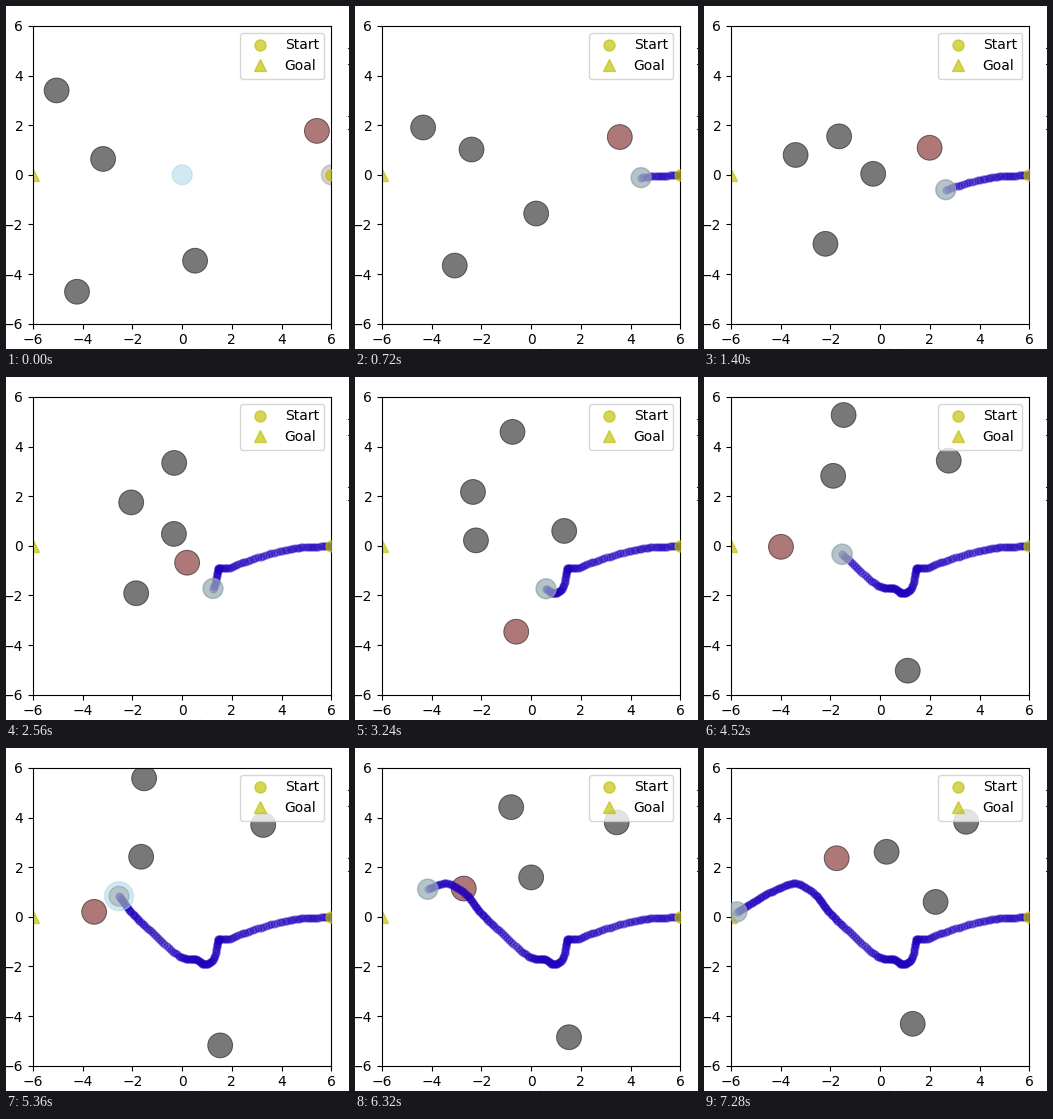
A matplotlib script that plays this animation: 343 by 343 pixels, repeating every 7720 ms.

```python
import numpy as np
import matplotlib.pyplot as plt
from matplotlib.animation import FuncAnimation
from matplotlib.lines import Line2D
from matplotlib.patches import Circle

SIZE, DPI = 343, 100
FRAMES, LAST = 193, 182
LEFT, RIGHT, TOP, BOTTOM = 27.0, 325.3, 19.9, 317.75
GREY, RED = "black", (0.4, 0, 0)
steps = np.arange(LAST + 1)


def glide(t, points):
    """Smooth curve through a few timed points, sampled at every step."""
    t, p = np.array(t), np.array(points)
    m = np.gradient(p, t, axis=0)
    i = np.clip(np.searchsorted(t, steps, side="right") - 1, 0, len(t) - 2)
    h = (t[i + 1] - t[i])[:, None]
    u = (steps - t[i])[:, None] / h
    ease = u * u * (3 - 2 * u)
    return (p[i] + (p[i + 1] - p[i]) * ease
            + h * u * (1 - u) * ((1 - u) * m[i] - u * m[i + 1]))


robot = glide(
    (0, 20, 35, 44, 51, 55, 64, 72, 81, 95, 113, 126, 134, 147, 160, 182),
    [(6, 0), (4.23, -.15), (2.64, -.6), (1.85, -.9), (1.45, -.9),
     (1.42, -1.08), (1.24, -1.72), (.92, -1.92), (.6, -1.73), (-.08, -1.6),
     (-1.53, -.34), (-2.23, .4), (-2.54, .83), (-3.38, 1.35), (-4.3, 1.05),
     (-5.76, .2)])

# All obstacles turn at the same moments.
turns = (0, 35, 64, 81, 113, 134, 182)
obstacles = np.array([glide(turns, way) for way in (
    [(-5.05, 3.4), (-3.4, .8), (-.33, .48), (1.33, .6), (2.76, 3.43),
     (3.26, 3.7), (3.46, 3.83)],
    [(-3.18, .64), (-1.65, 1.55), (-.32, 3.34), (-.75, 4.59), (-1.47, 5.27),
     (-1.53, 5.58), (.26, 2.62)],
    [(.52, -3.46), (-.28, .04), (-2.05, 1.75), (-2.34, 2.17), (-1.89, 2.82),
     (-1.65, 2.42), (2.23, .6)],
    [(-4.23, -4.71), (-2.2, -2.78), (-1.85, -1.91), (-2.22, .22),
     (-3.99, -.04), (-3.54, .2), (-1.75, 2.36)],
    [(5.42, 1.77), (1.99, 1.09), (.2, -.68), (-.6, -3.46), (1.11, -5.03),
     (1.53, -5.18), (1.31, -4.31)],
)])

# The closest obstacle at each step is highlighted.
nearest = np.linalg.norm(obstacles - robot, axis=2).argmin(axis=0)
halo_radius = 0.4 + 0.18 * np.exp(-((steps - 134) / 14) ** 2)

fig = plt.figure(figsize=(SIZE / DPI, SIZE / DPI), dpi=DPI, facecolor="white")
ax = fig.add_axes([LEFT / SIZE, 1 - BOTTOM / SIZE,
                   (RIGHT - LEFT) / SIZE, (BOTTOM - TOP) / SIZE])
ax.set(xlim=(-6, 6), ylim=(-6, 6),
       xticks=range(-6, 7, 2), yticks=range(-6, 7, 2))

trail, = ax.plot([], [], "o", color=(0.13, 0, 0.74), ms=5, alpha=0.4,
                 zorder=2)
ax.plot(6, 0, "yo", ms=8, alpha=0.65, zorder=4, label="Start")
ax.plot(-6, 0, "y^", ms=8, alpha=0.65, zorder=2, label="Goal")
ax.legend(loc="upper right")


def disc(radius, face, edge, alpha, zorder, lw=1):
    return ax.add_patch(Circle((0, 0), radius, facecolor=face, edgecolor=edge,
                               alpha=alpha, zorder=zorder, lw=lw))


balls = [disc(0.5, GREY, "black", 0.53, 1, 0.7) for _ in obstacles]
halo = disc(0.4, "lightblue", "lightblue", 0.55, 3)
body = disc(0.4, "gray", "gray", 0.35, 3.1)


def scrap(x, y):
    fig.add_artist(Line2D([x / SIZE, (x + 1.5) / SIZE], [1 - y / SIZE] * 2,
                          color="black", lw=0.8, alpha=0.8))


# Slivers of neighbouring labels cut off by the stage edge.
for x in (171.5, 184, 193.5):
    scrap(x, 342.5)
for y in (41.5, 57.5, 109.5, 123.5):
    scrap(341.5, y)


def update(i):
    n = min(i, LAST)
    trail.set_data(*robot[:n + 1].T)
    trail.set_visible(n > 0)
    for j, ball in enumerate(balls):
        ball.center = obstacles[j, n]
        ball.set_facecolor(RED if j == nearest[n] else GREY)
    body.center = robot[n]
    halo.center = robot[n] if n else (0, 0)
    halo.set_radius(halo_radius[n])
    return [trail, *balls, halo, body]


anim = FuncAnimation(fig, update, frames=FRAMES, interval=40,
                     init_func=lambda: update(0), repeat=True, repeat_delay=0)
plt.show()
```
